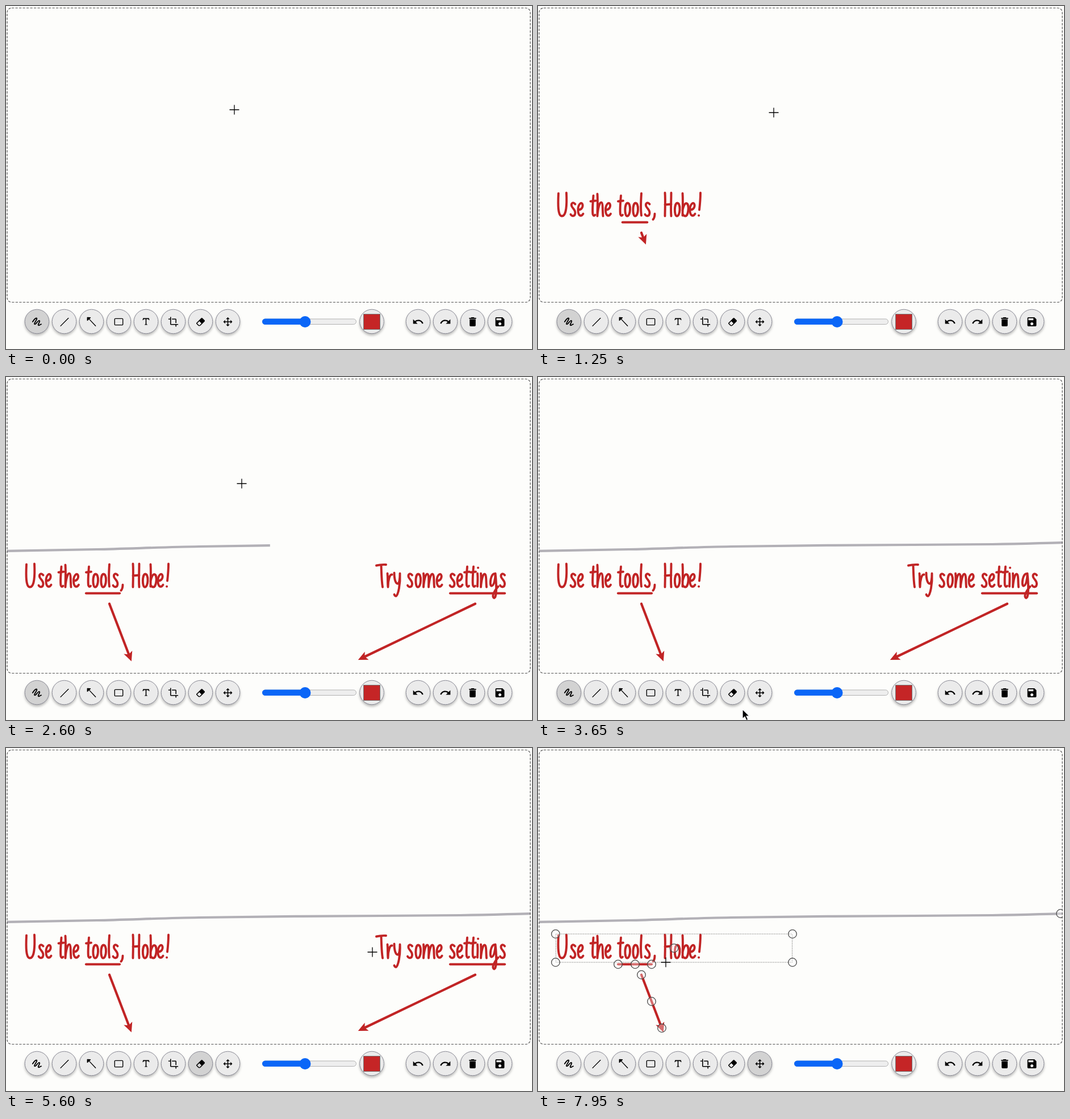
Recreate the animation shown at these times as an HTML page. Size 926 by 605 pixels, loop 8000 ms.

```html
<!DOCTYPE html>
<html lang="en">
<head>
<meta charset="utf-8">
<title>Whiteboard</title>
<style>
  html, body { margin: 0; width: 100%; height: 100%; overflow: hidden; background: #fdfdfb; }
  svg { display: block; }
  .ink { fill: none; stroke: #c12425; stroke-width: 4.2; stroke-linecap: round; stroke-linejoin: round; }
  .lettering { stroke-width: 3.9; }
  .button { fill: #ebebeb; stroke: #888893; filter: drop-shadow(0 3px 2px #0004); }
  .button.dark { fill: #d2d2d2; }
  .outline { fill: none; stroke: #000; stroke-width: 2; stroke-linecap: round; stroke-linejoin: round; }
  .handle { fill: #fff5; stroke: #484848; stroke-width: 1.3; }
</style>
</head>
<body>
<svg width="926" height="605" viewBox="0 0 926 605">
  <clipPath id="board"><rect x="2" y="3" width="921" height="520" rx="8"/></clipPath>
  <g clip-path="url(#board)">
    <path id="divider" class="ink" style="stroke:#b2b0b6;stroke-linecap:butt" pathLength="1" stroke-dasharray="1 2"
      d="M0 307C60 306 110 305 160 304S280 300 340 299S460 297 520 296.8S740 295.5 800 295S890 292.5 926 292"/>
    <g id="notes"></g>
    <g id="handles"></g>
  </g>
  <rect x="2" y="3.5" width="921" height="519" rx="8" fill="none" stroke="#555" stroke-width="1.2" stroke-dasharray="4.2 2.3"/>
  <g id="toolbar"></g>
  <rect x="451.5" y="552" width="165" height="9.5" rx="4.75" fill="#eee" stroke="#b2b2b2"/>
  <rect x="451" y="551.5" width="76" height="10.5" rx="5.25" fill="#0a66f7"/>
  <circle cx="526.5" cy="557" r="10" fill="#0a66f7"/>
  <g id="cursor">
    <path id="cross" d="M-8.5 0H8.5M0-8.5V8.5" stroke="#000" stroke-width="1.3"/>
    <path id="pointer" d="M0 0V17L4 13.3L6.8 19.6L9.8 18.3L7 12.2H12.4Z" stroke="#fff" stroke-width="1.2"/>
    <path id="hand" fill="#fff" stroke="#000" stroke-width="1.4" stroke-linejoin="round"
      d="M-2 1C-2-1 1-1 1.4 1L3 7.5C4 6 6 6 6.5 7.5C7.5 6.3 9.4 6.8 9.7 8.3C11 7.5 12.5 8.3 12.5 10V15L10.5 20.5H2.5L-4 12.5C-5.5 10-3 9 .5 12ZM3.5 13.5V17M6.2 13.5V17M8.9 13.5V17"/>
  </g>
</svg>
<script>
const LOOP = 8000;
const $ = id => document.getElementById(id);
const clamp = v => Math.max(0, Math.min(1, v));
const phase = (t, start, length) => clamp((t - start) / length);
const show = (node, on) => node.setAttribute('visibility', on ? 'visible' : 'hidden');

function add(parent, tag, attrs) {
  const node = document.createElementNS('http://www.w3.org/2000/svg', tag);
  for (const key in attrs) node.setAttribute(key, attrs[key]);
  return parent.appendChild(node);
}

// Handwritten letters: [advance, pen path above the baseline]
const letters = {
  ' ': [9.5, ''],
  U: [20.5, 'M0-40C-1-20-1 0 6 0C14 0 15-20 14-41'],
  H: [17, 'M1-41C2-26 1-12 1 0M12-41C12-26 11-12 12 0M1-20L12-21'],
  T: [18.5, 'M0-38Q8-40 17-39.5M8.5-39C9-25 9-12 11 0'],
  s: [14, 'M9-21C5-26 1-22 3-17C5-13 9-11 9-6C9 1 3 1 1-3'],
  e: [12.5, 'M1-11C5-11 9-15 8-20C7-26 0-22 0-11C0 1 6 1 9-4'],
  t: [11, 'M5-36C4-24 3-10 4-3C5 0 7 0 8-2M0-26L9-27'],
  h: [15.5, 'M1-39C2-25 1-12 1 0C2-15 5-24 8-24C11-24 10-8 11 0'],
  o: [14, 'M6-23C0-23 0 0 5 0C11 0 12-22 6-23'],
  l: [7.5, 'M2-40C1-25 1-8 2-1'],
  ',': [11.5, 'M4-4C4 1 3 4 1 6'],
  b: [14, 'M1-40C2-25 1-12 1-1M1-10C3-20 6-24 9-22C13-18 11 0 6 0C3 0 2-2 1-4'],
  '!': [8, 'M6-41C6-30 5-20 4-11M3-1h.1'],
  r: [12, 'M1-24C2-15 1-8 2 0C2-12 5-23 9-22'],
  y: [14, 'M1-25C1-12 4-6 7-6C10-6 11-15 11-24C12-5 8 14 4 16Q2 16 1 13'],
  m: [24.5, 'M1-24C2-15 1-8 1 0C2-14 5-24 8-23C11-22 10-8 10 0C11-14 14-24 17-23C20-22 19-8 20 0'],
  i: [6, 'M1-24C2-15 1-8 1-1M2-34h.1'],
  n: [15.5, 'M1-24C2-15 1-8 1 0C2-14 5-24 8-23C11-22 10-8 11 0'],
  g: [18.5, 'M11-23C3-27 0-3 4-2C9-2 11-15 11-24C13-5 13 10 11 17C9 22 5 18 8 11C10 7 13 2 16-1']
};

function write(text, x, y) {
  const group = add($('notes'), 'g', { class: 'ink lettering', role: 'img', 'aria-label': text });
  for (const char of text) {
    const [advance, d] = letters[char];
    if (d) add(group, 'path', { d, transform: `translate(${x} ${y})` });
    x += advance;
  }
  return group;
}

function makeNote({ text, x, rule, from, to, start, erased }) {
  const angle = Math.atan2(to[1] - from[1], to[0] - from[0]) * 180 / Math.PI;
  const label = write(text, x, 370.5);
  const line = add($('notes'), 'line', { class: 'ink', y1: 381.5, y2: 381.5 });
  const arrow = add($('notes'), 'g', {});
  const shaft = add(arrow, 'line', { class: 'ink', x1: from[0], y1: from[1] });
  const head = add(arrow, 'path', { d: 'M8 0L-9-8L-5 0L-9 8Z', fill: '#c12425' });
  const [textEnd, lineEnd, arrowEnd] = erased;
  return t => {
    label.setAttribute('opacity', t < textEnd ? phase(t, start, 400) : 0);
    const spread = phase(t, start + 117, 400), mid = (rule[0] + rule[1]) / 2;
    line.setAttribute('x1', mid + (rule[0] - mid) * spread);
    line.setAttribute('x2', mid + (rule[1] - mid) * spread);
    show(line, spread > 0 && t < lineEnd);
    const grow = phase(t, start + 355, 400);
    const [ex, ey] = [0, 1].map(i => from[i] + (to[i] - from[i]) * grow);
    shaft.setAttribute('x2', ex);
    shaft.setAttribute('y2', ey);
    head.setAttribute('transform', `translate(${ex} ${ey}) rotate(${angle})`);
    show(arrow, grow > 0 && t < arrowEnd);
  };
}

const notes = [
  makeNote({ text: 'Use the tools, Hobe!', x: 36, rule: [141, 200], from: [182, 400], to: [218, 494],
    start: 840, erased: [LOOP, LOOP, LOOP] }),
  makeNote({ text: 'Try some settings', x: 652, rule: [782, 878], from: [826, 400], to: [627, 495.5],
    start: 1550, erased: [5850, 6150, 6400] })
];

// Toolbar icons on a 24-unit grid: [centre x, scale, path, stroke width]
const undo = 'M12.5 8c-2.65 0-5.05.99-6.9 2.6L2 7v9h9l-3.62-3.62c1.39-1.16 3.16-1.88 5.12-1.88 3.54 0 6.55 2.31 7.6 5.5l2.37-.78C21.08 11.03 17.15 8 12.5 8z';
const icons = [
  [54.5, .8, 'M2.5 12C5 8 9 3 11.5 4C14 6 5 14 6.5 17C9 20 14 8 17.5 9.5C20 11 13 18 15 19.5C17 21 19 17 21.5 17.5', 2.3],
  [102.5, .8, 'M4 21.2L21.2 4', 1.7],
  [150.5, .8, 'M21 21L5 4M3 2.5V9L9.5 3Z', 1.7],
  [198.5, .8, 'M4.5 5H19.5Q21 5 21 6.5V17.5Q21 19 19.5 19H4.5Q3 19 3 17.5V6.5Q3 5 4.5 5Z', 1.7],
  [246.5, .8, 'M5.5 4H18.5L19.6 8.4L18.7 8.6Q17.4 6 15.5 6H13V16.5Q13 18 15 18V19H9V18Q11 18 11 16.5V6H8.5Q6.6 6 5.3 8.6L4.4 8.4Z'],
  [294.5, .78, 'M17 15h2V7c0-1.1-.9-2-2-2H9v2h8v8zM7 17V1H5v4H1v2h4v10c0 1.1.9 2 2 2h10v4h2v-4h4v-2H7z'],
  [342.5, .77, 'M16.24 3.56L21.2 8.5Q22.6 9.9 21.2 11.3L12 20.5Q9 23 6.3 20.5L2.8 17Q1.4 15.6 2.8 14.2L13.4 3.6Q14.8 2.2 16.24 3.56M4.2 15.6L7.8 19.1Q9.2 20.5 10.6 19.1L14.1 15.6L9.2 10.6Z'],
  [390.5, .78, 'M13 6V11H18V7.75L22.25 12L18 16.25V13H13V18H16.25L12 22.25L7.75 18H11V13H6V16.25L1.75 12L6 7.75V11H11V6H7.75L12 1.75L16.25 6Z'],
  [644, 1, ''],
  [725.5, .88, undo],
  [773.5, .88, undo],
  [821.5, .88, 'M6 19c0 1.1.9 2 2 2h8c1.1 0 2-.9 2-2V7H6v12zM19 4h-3.5l-1-1h-5l-1 1H5v2h14V4z'],
  [869.5, .88, 'M17 3H5c-1.1 0-2 .9-2 2v14c0 1.1.9 2 2 2h14c1.1 0 2-.9 2-2V7l-4-4zm-5 16c-1.66 0-3-1.34-3-3s1.34-3 3-3 3 1.34 3 3-1.34 3-3 3zm3-10H5V5h10v4z']
];
const [PEN, ARROW, ERASER, MOVE, COLOUR, REDO] = [0, 2, 6, 7, 8, 10];
const buttons = icons.map(([x, scale, d, stroke], i) => {
  const node = add($('toolbar'), 'circle', { class: 'button', cx: x, cy: 556.5, r: 21.3 });
  if (i === COLOUR) {
    add($('toolbar'), 'rect', { x: 629.5, y: 543.5, width: 29, height: 27, fill: '#c52526', stroke: '#777' });
  } else {
    const flip = i === REDO ? -scale : scale;
    const icon = add($('toolbar'), 'path', { d, 'fill-rule': 'evenodd',
      transform: `translate(${x} 557) scale(${flip} ${scale}) translate(-12 -12)` });
    if (stroke) {
      icon.setAttribute('class', 'outline');
      icon.style.strokeWidth = stroke;
      if (i === ARROW) icon.style.fill = '#000';
    }
  }
  return { x, node };
});

add($('handles'), 'rect', { x: 31.5, y: 328, width: 416, height: 50, fill: 'none', stroke: '#777', 'stroke-dasharray': '1.5 1.5' });
const grips = [[31, 328], [448, 328], [31, 378], [448, 378], [239.5, 353], [141, 381.5], [171, 381.5],
  [200, 381.5], [182, 400], [200, 447], [218, 494], [920, 292]];
for (const [cx, cy] of grips) add($('handles'), 'circle', { class: 'handle', cx, cy, r: 7.3 });

// Mouse stops: time, x, y
const stops = [[0, 402, 183], [400, 415, 188], [2700, 415, 188], [3400, 380, 540], [3650, 360, 586], [4000, 343, 565],
  [4450, 343, 563], [5300, 645, 360], [5700, 645, 360], [6150, 800, 381], [6420, 755, 433], [6930, 261, 571],
  [6970, 261, 571], [7130, 325, 583], [7300, 391, 563], [7470, 391, 561], [7900, 225, 378], [LOOP, 225, 378]];

function mouseAt(t) {
  const i = stops.findIndex(stop => stop[0] > t);
  const [a, b] = [stops[i - 1], stops[i]];
  const p = phase(t, a[0], b[0] - a[0]), eased = p * p * (3 - 2 * p);
  return [1, 2].map(k => a[k] + (b[k] - a[k]) * eased);
}

function draw(t) {
  notes.forEach(update => update(t));
  const drawn = phase(t, 2350, 500);
  $('divider').setAttribute('stroke-dashoffset', 1 - drawn);
  show($('divider'), drawn > 0);
  show($('handles'), t >= 7400);

  const [x, y] = mouseAt(t);
  const tool = t < 4250 ? PEN : t < 7400 ? ERASER : MOVE;
  let hovering = false;
  buttons.forEach((button, i) => {
    const over = Math.hypot(x - button.x, y - 556.5) < 21.5;
    hovering ||= over;
    button.node.classList.toggle('dark', over || i === tool);
  });
  $('cursor').setAttribute('transform', `translate(${x} ${y})`);
  show($('cross'), y < 523);
  show($('hand'), hovering);
  show($('pointer'), y >= 523 && !hovering);
}

const begin = performance.now();
function frame() {
  draw((performance.now() - begin) % LOOP);
  requestAnimationFrame(frame);
}
frame();
</script>
</body>
</html>
```
